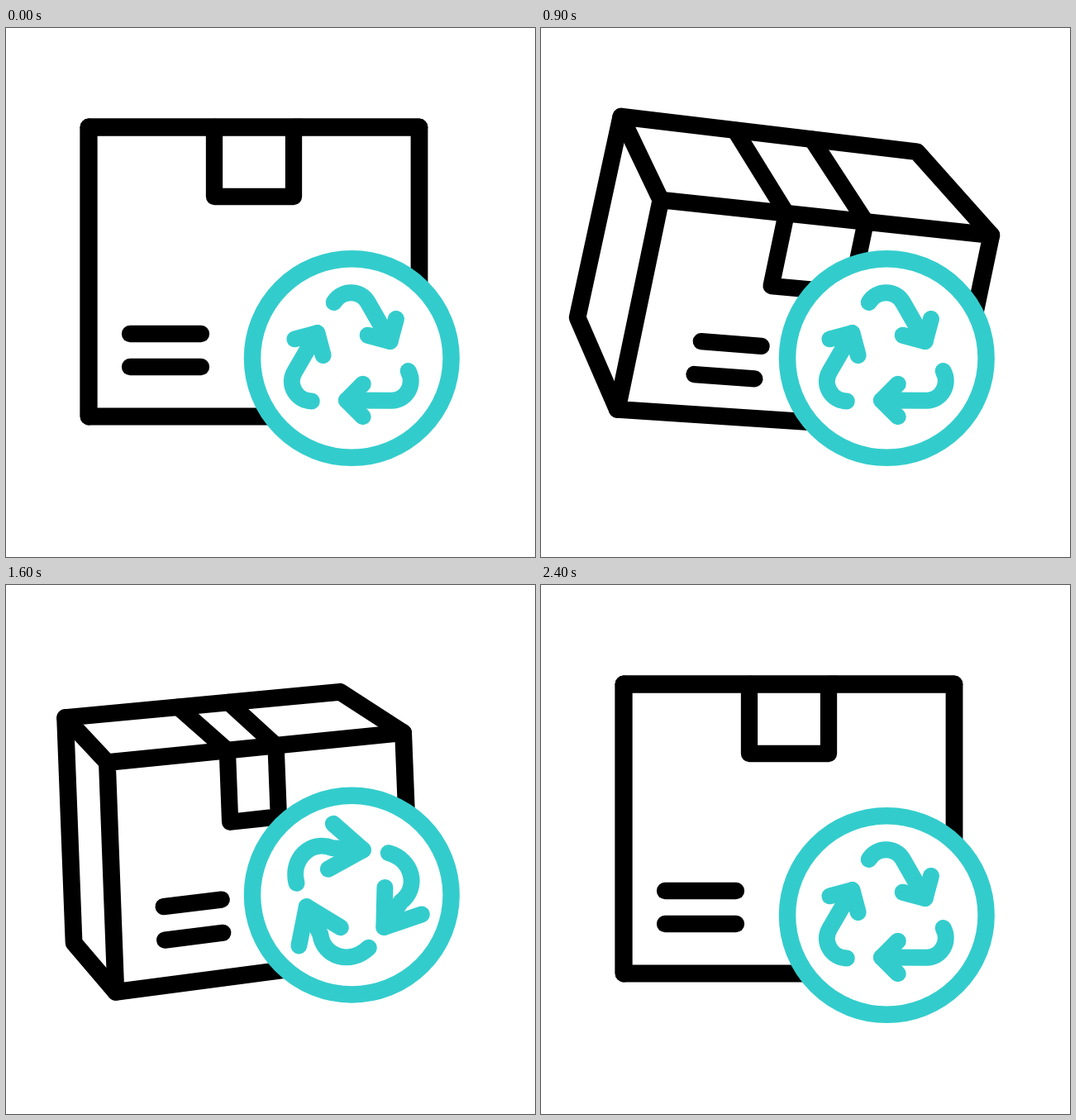
An HTML page with a canvas that plays this animation: 640x640 px, repeating every 3.6 s.

```html
<!DOCTYPE html>
<html lang="en">
<head>
<meta charset="utf-8">
<title>Parcel recycling</title>
<style>
  html, body { margin: 0; width: 100%; height: 100%; overflow: hidden; background: #fff; }
  canvas { display: block; width: 100vmin; height: 100vmin; }
</style>
</head>
<body>
<canvas id="stage" width="640" height="640"></canvas>
<script>
const ctx = document.getElementById('stage').getContext('2d');
const LOOP = 3600, STEP = 20, END = 2400, TEAL = '#33cccc';

const span = (t, a, b) => Math.min(1, Math.max(0, (t - a) / (b - a)));
const sine = x => (1 - Math.cos(Math.PI * x)) / 2;
const lerp = (a, b, u) => a + (b - a) * u;
const mix = (a, b, u) => [lerp(a[0], b[0], u), lerp(a[1], b[1], u)];
const add = (p, q) => [p[0] + q[0], p[1] + q[1]];

// A box pose: front corners clockwise from top left, depth of its left and
// right sides, how far the label has slid, how narrow the tape has become.
const pose = (front, depth = [[0, 0], [0, 0]], slide = 0, narrow = 0) =>
  ({ front, depth, slide, narrow });

function flat(degrees) {
  const a = degrees * Math.PI / 180, c = Math.cos(a), s = Math.sin(a);
  const corners = [[-200, -175], [200, -175], [200, 175], [-200, 175]];
  return pose(corners.map(([x, y]) => [300 + x * c - y * s, 295 + x * s + y * c]));
}

const rest = flat(0);
const tilted = pose([[110, 219], [498, 121], [551, 452], [164, 567]], [[-76, -67], [-111, -57]]);
const swung = pose([[145, 208], [545, 251], [495, 488], [92, 461]], [[-48, -101], [-90, -101]], 1);
const turned = pose([[143, 284], [469, 228], [481, 430], [155, 506]], [[-77, -82], [-116, -75]], 1, 1);
const moves = [[0, rest], [615, tilted], [910, swung], [1430, turned], [1800, flat(-1.4)], [END, rest]];

function poseAt(t) {
  if (t >= END) return rest;
  const i = moves.findIndex(m => m[0] > t);
  const [t0, a] = moves[i - 1], [t1, b] = moves[i];
  const e = sine(span(t, t0, t1));
  const blend = (key, u) => a[key].map((p, k) => mix(p, b[key][k], u));
  return pose(blend('front', e), blend('depth', e ** 1.3),
    lerp(a.slide, b.slide, e), lerp(a.narrow, b.narrow, e));
}

function line(...pts) {
  ctx.beginPath();
  pts.forEach(p => ctx.lineTo(...p));
  ctx.stroke();
}

function drawBox(t) {
  const { front: [tl, tr, br, bl], depth: [left, right], slide, narrow } = poseAt(t);
  const btl = add(tl, left), btr = add(tr, right), bbl = add(bl, [left[0], left[1] * 1.1]);
  const at = (u, v) => mix(mix(tl, tr, u), mix(bl, br, u), v);
  const gap = (p, q) => Math.hypot(p[0] - q[0], p[1] - q[1]);
  const height = (gap(tl, bl) + gap(tr, br)) / 2;
  const lift = -right[1];

  ctx.strokeStyle = '#000';
  ctx.lineWidth = 20.8;
  line(tl, tr, br, bl, tl, tr);
  line(tl, btl, btr, tr);
  line(btl, bbl, bl);

  const mid = .5 - .0215 * narrow, half = .12 - .0675 * narrow;
  const len = (84 + .05 * lift) / height;
  const back = side => mix(btl, btr, mid + .015 + side * (half + .01));
  ctx.lineWidth = 20.3;
  line(back(-1), at(mid - half, 0), at(mid - half, len),
    at(mid + half, len), at(mid + half, 0), back(1));

  for (const rise of [100, 60]) {
    const v = 1 - (rise - .12 * lift) / height;
    line(at(.125 + .082 * slide, v), at(.34 + .048 * slide, v));
  }
}

const hop = (t, start, peak, height) =>
  height * (t < peak ? sine(span(t, start, peak)) : 1 - sine(span(t, peak, END)));

// One arrow about the hub; s stretches it while it travels.
function drawArrow(s) {
  const tip = [47 + 5 * s, -20.5];
  const barb = side => {
    const a = (240 + side * (45 - 10 * s)) * Math.PI / 180, r = 28 + 20 * s;
    return add(tip, [r * Math.cos(a), r * Math.sin(a)]);
  };
  ctx.beginPath();
  ctx.moveTo(-21 - 7 * s, -67.5 + 6 * s);
  ctx.bezierCurveTo(-11.6 + 3 * s, -83 - 2 * s, 11 + 14 * s, -83.5 + 4.5 * s, 20 + 12 * s, -67.7 + 16 * s);
  ctx.lineTo(...tip);
  ctx.stroke();
  line(barb(-1), tip, barb(1));
}

function drawBadge(t) {
  ctx.beginPath();
  ctx.arc(418.3, 399.5 - hop(t, 1200, 1850, 36), 120.3, 0, 2 * Math.PI);
  ctx.fillStyle = '#fff';
  ctx.fill();
  ctx.strokeStyle = TEAL;
  ctx.lineWidth = 20.5;
  ctx.stroke();

  // Each arrow moves on by two places.
  const p = span(t, 1230, END);
  const turn = 2 * lerp(sine(p), p, .55);
  const stretch = Math.min(1, 1.2 * Math.abs(Math.sin(Math.PI * turn)) ** .4);
  ctx.lineWidth = 20;
  for (let i = 0; i < 3; i++) {
    ctx.save();
    ctx.translate(417.7, 399.5 - hop(t, 1270, 1840, 40));
    ctx.rotate((turn + i) * 2 * Math.PI / 3);
    drawArrow(stretch);
    ctx.restore();
  }
}

function draw(t) {
  ctx.fillStyle = '#fff';
  ctx.fillRect(0, 0, 640, 640);
  ctx.lineCap = ctx.lineJoin = 'round';
  drawBox(t);
  drawBadge(t);
}

const begin = performance.now();
function tick() {
  const t = (performance.now() - begin) % LOOP;
  draw(Math.floor(t / STEP) * STEP);
  requestAnimationFrame(tick);
}
tick();
</script>
</body>
</html>
```
